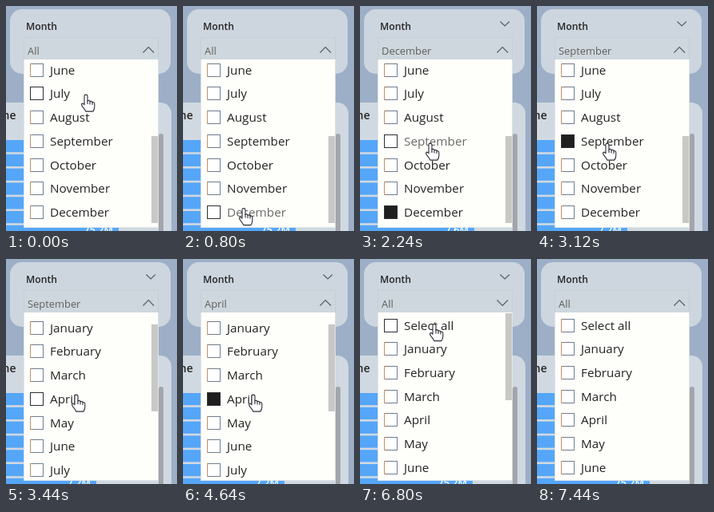
Recreate the animation shown at these times as an HTML page. Size 214 by 282 pixels, loop 7.52 s.

```html
<!DOCTYPE html>
<html lang="en">
<head>
<meta charset="utf-8">
<title>Month slicer</title>
<style>
  html, body { margin: 0; width: 100%; height: 100%; overflow: hidden; background: #9dafc7; }
  svg { display: block; width: 100%; height: 100%; }
  text { font-family: "Open Sans", "Noto Sans", sans-serif; fill: #252423; }
  .item { font-size: 15.3px; }
  .strong { font-weight: 600; }
  .line { fill: none; stroke: #555d68; stroke-width: 1.2; }
</style>
</head>
<body>
<svg viewBox="0 0 214 282" preserveAspectRatio="none">
  <defs>
    <clipPath id="view"><rect x="22" y="67" width="169" height="211"/></clipPath>
    <linearGradient id="edge">
      <stop offset=".03" stop-color="#bd9268"/>
      <stop offset=".1" stop-color="#747a82"/>
      <stop offset="1" stop-color="#6c7f95"/>
    </linearGradient>
  </defs>
  <rect width="214" height="282" fill="#9dafc7"/>

  <rect x="-30" y="121" width="237" height="200" rx="14" fill="#d0d9e1"/>
  <text class="strong" x="12.5" y="142" font-size="14" text-anchor="end">me</text>
  <g id="bars" fill="#55a6f8"></g>
  <text id="total" class="strong" y="285" font-size="12.5" style="fill:#fff" text-anchor="end"></text>
  <rect x="191" y="160" width="6" height="130" rx="3" fill="#a2a5aa"/>

  <rect x="5" y="4" width="201" height="81" rx="15" fill="#cdd6df"/>
  <text class="strong" x="25" y="30" font-size="12.2">Month</text>
  <path id="more" class="line" d="M175.5 19.5l5.7 5.5 5.7-5.5"/>
  <rect x="22.5" y="39.5" width="168" height="28" fill="#ced7dd" stroke="#c5ced6"/>
  <text id="value" x="27" y="61" font-size="12.9" style="fill:#605e5c"></text>
  <path id="arrow" class="line"/>

  <rect x="22" y="67" width="169" height="211" fill="#fefefb"/>
  <g clip-path="url(#view)">
    <g id="list"></g>
    <rect id="thumb" x="182" width="8" height="109" fill="#c8c8c6"/>
  </g>
  <path d="M22.5 67V277.5H190.5V67" fill="none" stroke="#e2e5e6"/>

  <g id="hand" stroke="#2a2d36" stroke-width="1.1" stroke-linejoin="round" stroke-linecap="round">
    <path fill="#fff" d="M-2 1.4Q-2 -.4 0 -.4T2 1.4V7.2Q4.6 6.2 5 8.2Q7.4 7.2 8 9.2Q10.8 8.6 10.8 11.2V15Q10.8 18 8.8 20.6H-.2Q-1.4 18-4.4 14.4Q-6.2 11.8-4.8 10.8Q-3.6 10.2-2 12.2Z"/>
    <path fill="none" d="M2 7.4V11M5 8.4V11.4M8 9.4V12"/>
  </g>
</svg>
<script>
const LOOP = 7520, STEP = 80, PITCH = 29.7, TOP = 83.5;
const NAMES = ["Select all", "January", "February", "March", "April", "May", "June",
  "July", "August", "September", "October", "November", "December"];
const $ = id => document.getElementById(id);

// [from, until, value at the end]; each move eases between the two times
const CURSOR = { start: [100, 111.5], moves: [
  [160, 800, [76, 254]],
  [1920, 2240, [88, 172.5]],
  [3280, 3440, [88, 170.5]],
  [4800, 5200, [93, 82]],
  [7200, 7440, [118, -26]]
] };
const SCROLL = { start: [181], moves: [
  [3280, 3440, [26.5]],
  [4800, 5120, [0]]
] };

// [time, chosen row or -1]
const CHOICES = [[0, -1], [1360, 12], [2800, 9], [4320, 4], [5920, -1]];
// [time, label, bar end]
const TOTALS = [[0, "75.2M", 141], [1600, "7.6M", 143], [3120, "7.2M", 113],
  [4640, "7.2M", 127], [6160, "75.2M", 141]];
const FADED = [[800, 1360], [2160, 2800], [5200, 5920]];

function make(tag, attrs, parent) {
  const el = document.createElementNS("http://www.w3.org/2000/svg", tag);
  for (const key in attrs) el.setAttribute(key, attrs[key]);
  return parent.appendChild(el);
}

const bars = [];
for (let i = 0; i < 7; i++) {
  bars.push(make("rect", { x: 0, y: 168 + 17.8 * i, width: 141, height: 15.2 }, $("bars")));
}

const rows = NAMES.map(name => {
  const g = make("g", {}, $("list"));
  const box = make("rect", { x: 30.5, y: -8.5, width: 16, height: 16 }, g);
  const dot = make("rect", { x: 34, y: -5, width: 9, height: 9, fill: "#333" }, g);
  const label = make("text", { class: "item", x: 55, y: 5 }, g);
  label.textContent = name;
  return { g, box, dot, label };
});

const ease = p => p * p * (3 - 2 * p);
const latest = (table, t) => table.filter(row => row[0] <= t).pop();

function track({ start, moves }, t) {
  let now = start;
  for (const [from, until, goal] of moves) {
    if (t <= from) break;
    const p = ease(Math.min(1, (t - from) / (until - from)));
    now = now.map((v, i) => v + (goal[i] - v) * p);
  }
  return now;
}

function draw(time) {
  const t = Math.floor(time % LOOP / STEP) * STEP;
  const [x, y] = track(CURSOR, t);
  const [scroll] = track(SCROLL, t);
  const chosen = latest(CHOICES, t)[1];
  const [, total, end] = latest(TOTALS, t);
  const inside = y > 66;
  const over = inside ? Math.round((y + 5 + scroll - TOP) / PITCH) : -1;
  const faded = FADED.some(([a, b]) => t >= a && t < b);

  $("hand").setAttribute("transform", `translate(${x} ${y})`);
  $("thumb").setAttribute("y", 68 + scroll * 0.525);
  $("thumb").style.display = inside ? "" : "none";
  $("value").textContent = chosen < 0 ? "All" : NAMES[chosen];
  $("more").style.display = t >= 1360 && t < 7440 ? "" : "none";
  $("arrow").setAttribute("d", t >= 6800 && t < 7440
    ? "M171.5 51.5l6.8 6.8 6.8-6.8" : "M171.5 58.5l6.8-6.8 6.8 6.8");
  $("total").textContent = total;
  $("total").setAttribute("x", end - 7);
  bars[6].setAttribute("width", end);

  rows.forEach(({ g, box, dot, label }, i) => {
    const hot = i === over;
    g.setAttribute("transform", `translate(0 ${Math.round(TOP + PITCH * i - scroll)})`);
    box.setAttribute("fill", i === chosen ? "#1f1f1f" : "#fff");
    box.setAttribute("stroke", hot || i === chosen ? "#2b2f36" : "url(#edge)");
    dot.style.display = i === 0 && chosen >= 0 ? "" : "none";
    label.style.fill = hot && faded ? "#6b6966" : "#252423";
  });
}

const began = performance.now();
function tick() {
  draw(performance.now() - began);
  requestAnimationFrame(tick);
}
tick();
</script>
</body>
</html>
```
